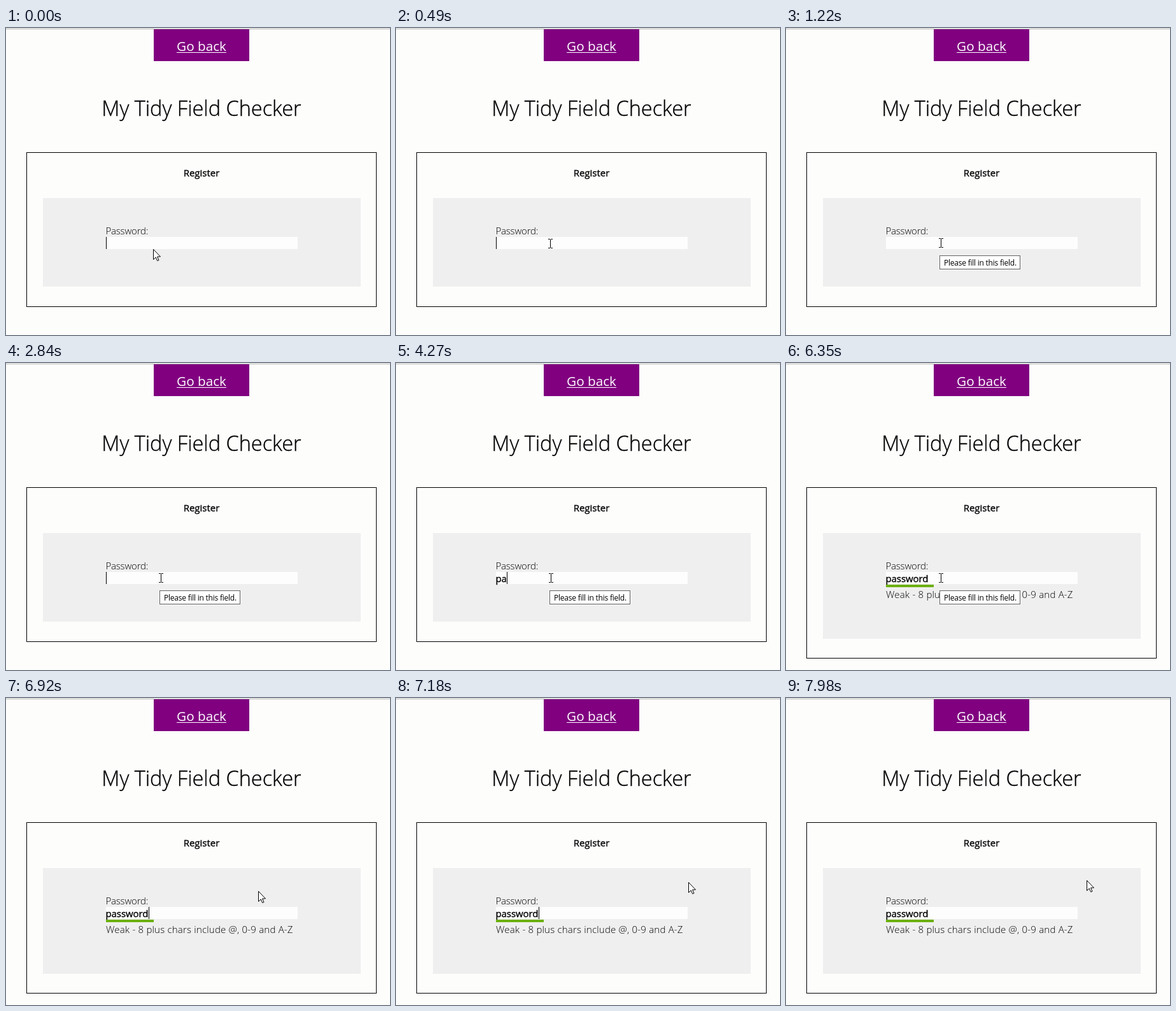
These frames come from a looping animation (603 by 482 pixels, 8000 ms). An HTML page:

```html
<!DOCTYPE html>
<html lang="en">
<head>
<meta charset="utf-8">
<title>Form</title>
<style>
  html, body { margin: 0; width: 100%; height: 100%; overflow: hidden; background: #fdfdfc; }
  svg { display: block; width: 603px; height: 482px; font-family: "Open Sans", "Noto Sans", sans-serif; }
  text { fill: #000; white-space: pre; }
  .light { font-weight: 300; font-size: 15px; }
  .mid { text-anchor: middle; }
  .firm { stroke: #000; stroke-width: .35px; }
</style>
</head>
<body>
<svg viewBox="0 0 603 482">
  <path d="M0 1.5H603" stroke="#b4b4b4"/>
  <rect x="232" y="2" width="150" height="50" fill="#800080"/>
  <text class="mid" x="307" y="36" font-size="20.7" style="fill:#fff">Go back</text>
  <path d="M268 38.5H346" stroke="#fff"/>
  <text class="mid light firm" x="307" y="138" style="font-size:32.5px">My Tidy Field Checker</text>

  <rect id="frame" x="32.5" y="195.5" width="549" fill="none" stroke="#000"/>
  <text class="mid firm" x="307" y="233" font-size="15">Register</text>
  <rect id="panel" x="58" y="267" width="499" fill="#efefef"/>
  <text class="light" x="156.5" y="324" letter-spacing="-.2">Password:</text>
  <rect x="157" y="328" width="301" height="19" fill="#fdfdfd"/>
  <text id="typed" class="firm" x="156.5" y="344" font-size="15" letter-spacing="-.1"></text>
  <rect id="caret" y="328" width="1" height="19"/>

  <g id="result">
    <rect x="157" y="348" width="75" height="4" fill="#6cb010"/>
    <text class="light" x="157" y="369" letter-spacing=".2">Weak - 8 plus chars include @, 0-9 and A-Z</text>
  </g>

  <g id="tip">
    <rect x="241.5" y="357.5" width="126" height="21" fill="#fff" stroke="#646464"/>
    <text x="248" y="373" font-size="12" letter-spacing="-.23">Please fill in this field.</text>
  </g>

  <path id="arrow" d="M.5 .5V16.5L4.2 13L6.7 18.5L9 17.5L6.6 12H11.5Z" fill="#fff" stroke="#000"/>
  <path id="beam" d="M-3 -6.5H0M1 -6.5H4M-3 7.5H0M1 7.5H4M.5 -6V7" fill="none" stroke="#000"/>
</svg>
<script>
const $ = id => document.getElementById(id);
const LOOP = 8000, WORD = "password";
const keyTimes = [4170, 4270, 4520, 4740, 5000, 5140, 5360, 5560];
const BLINK = 615, BLINK_LAG = 95, TIP_AT = 1220;

const show = (id, on) => $(id).setAttribute("visibility", on ? "visible" : "hidden");
const easeOut = (t, from, to) => 1 - (1 - Math.min(1, Math.max(0, (t - from) / (to - from)))) ** 2.3;

// The pointer slides into the field, rests, then leaves to the upper right.
function pointerAt(t) {
  const enter = easeOut(t, 210, 610), leave = easeOut(t, 6620, 7410);
  return [231 + 12 * enter + 229 * leave, 347 - 10 * enter - 51 * leave].map(Math.round);
}

function draw(t) {
  const n = keyTimes.filter(k => k <= t).length;
  const typed = $("typed");
  typed.textContent = WORD.slice(0, n);

  // Each key press restarts the blinking.
  const sinceKey = t - (n ? keyTimes[n - 1] : 0);
  $("caret").setAttribute("x", 157 + Math.round(typed.getComputedTextLength()));
  show("caret", Math.floor(Math.max(0, sinceKey - BLINK_LAG) / BLINK) % 2 === 0);

  const done = n === WORD.length;
  show("result", done);
  $("frame").setAttribute("height", done ? 268 : 242);
  $("panel").setAttribute("height", done ? 166 : 139);

  const [x, y] = pointerAt(t);
  const inField = y >= 328 && y < 347;
  show("tip", inField && t >= TIP_AT);
  show("beam", inField);
  show("arrow", !inField);
  $(inField ? "beam" : "arrow").setAttribute("transform", `translate(${x} ${y})`);
}

const start = performance.now();
function tick() {
  draw((performance.now() - start) % LOOP);
  requestAnimationFrame(tick);
}
tick();
</script>
</body>
</html>
```
